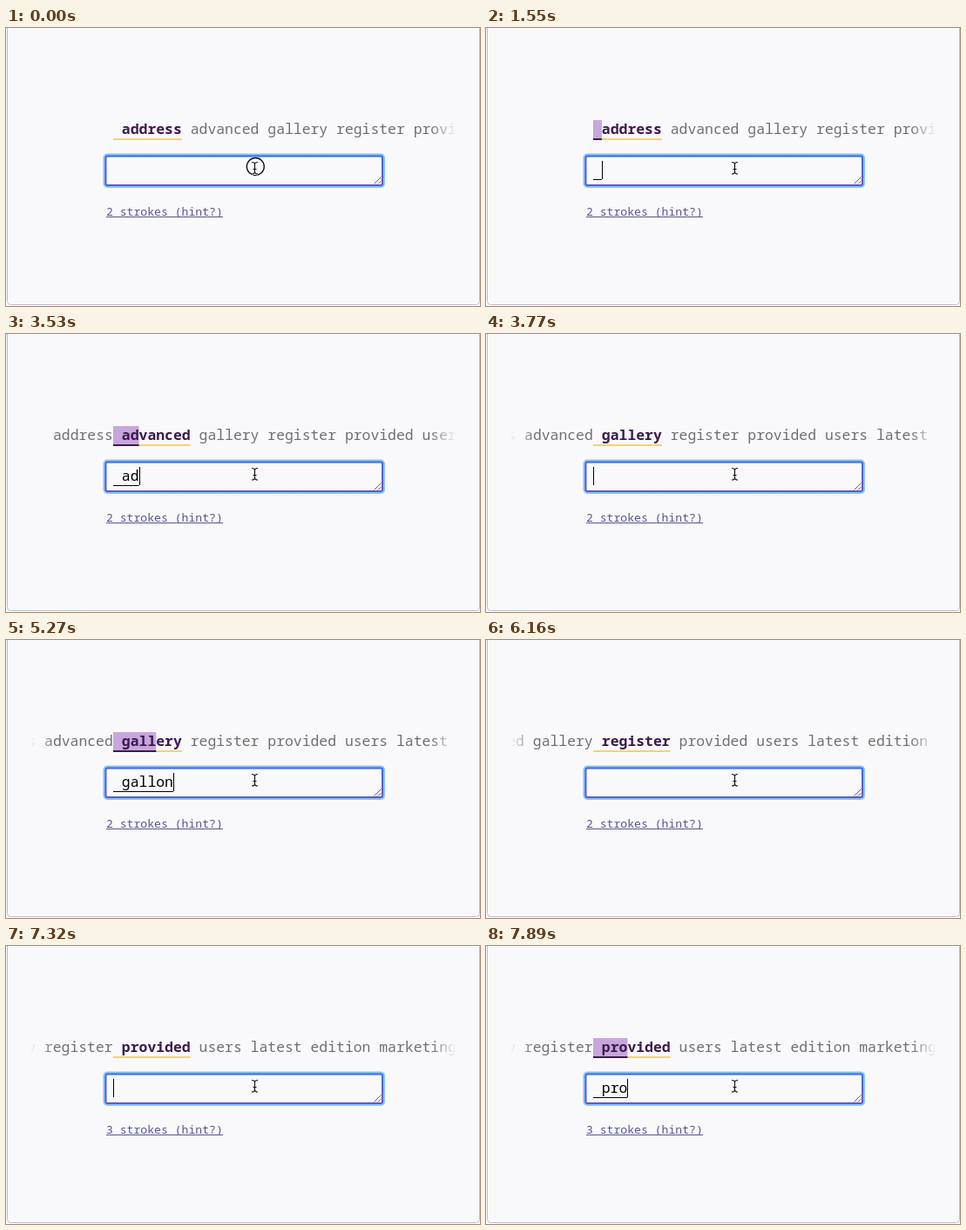
Write an HTML page that moves like this. It is 544x320 px and loops after 8 s.

```html
<!DOCTYPE html>
<html lang="en">
<head>
<meta charset="utf-8">
<title>Typing practice</title>
<style>
  html, body { margin: 0; width: 100%; height: 100%; overflow: hidden; background: #fff; }
  svg { display: block; width: 544px; height: 320px; }
  text { font: 16.427px "Noto Sans Mono", monospace; white-space: pre; }
  .word { fill: #716d73; }
  #current { fill: #3b1a4c; font-weight: 700; }
  #hint { fill: #57558c; font-size: 13.14px; font-weight: 500; }
</style>
</head>
<body>
<svg viewBox="0 0 544 320">
  <defs>
    <linearGradient id="fade">
      <stop offset="0" stop-color="#000"/>
      <stop offset=".055" stop-color="#fff"/>
      <stop offset=".94" stop-color="#fff"/>
      <stop offset="1" stop-color="#000"/>
    </linearGradient>
    <mask id="edges" maskUnits="userSpaceOnUse" x="28" y="100" width="489" height="40">
      <rect x="28" y="100" width="489" height="40" fill="url(#fade)"/>
    </mask>
    <linearGradient id="border" x2="0" y2="1">
      <stop offset="0" stop-color="#3f6bdc"/>
      <stop offset="1" stop-color="#6358c4"/>
    </linearGradient>
    <filter id="blur" x="-5%" y="-40%" width="110%" height="180%">
      <feGaussianBlur stdDeviation=".7"/>
    </filter>
  </defs>

  <rect x="1.5" y="-9.5" width="542" height="328" rx="4" fill="#f9f9fc" stroke="#bcbcc9"/>

  <g mask="url(#edges)">
    <rect id="mark" x="123" y="106" height="21" fill="#c9a5dd"/>
    <rect id="goal" x="123" y="127" height="2" fill="#fbd166"/>
    <rect id="done" x="123" y="127" height="2" fill="#3b1a4c"/>
    <text id="before" class="word" y="122"></text>
    <text id="current" x="123" y="122"></text>
    <text id="after" class="word" y="122"></text>
  </g>

  <rect x="114" y="147" width="318.5" height="34.5" rx="2.5" fill="none" stroke="#86c1fa" stroke-width="5" filter="url(#blur)"/>
  <rect x="114.5" y="147.5" width="317.5" height="33.5" rx="2" fill="#f9f9fc" stroke="url(#border)" stroke-width="2"/>
  <path d="M422.5 179.5l8-8M427 179.5l3.5-3.5" stroke="#666" stroke-width="1"/>
  <text id="typed" x="123" y="169"></text>
  <rect id="compose" x="123" y="174" height="1"/>
  <rect id="caret" y="153" width="1" height="21"/>

  <text id="hint" x="115" y="216"></text>
  <rect x="115" y="217" width="134" height="1" fill="#57558c"/>

  <g fill="none">
    <circle id="click" cx="286.3" cy="159.5" r="10" stroke="#111" stroke-width="1.3"/>
    <path id="beam" d="M282 154.500q3.500 0 3.500 2.500q0-2.500 3.500-2.500M285.500 156.500v9.500M283.500 162.500h4M282 168q3.500 0 3.500-2.500q0 2.500 3.500 2.500" stroke="#fff" stroke-width="3"/>
    <use href="#beam" style="display:none"/>
    <path d="M282 154.500q3.500 0 3.500 2.500q0-2.500 3.500-2.500M285.500 156.500v9.500M283.500 162.500h4M282 168q3.500 0 3.500-2.500q0 2.500 3.500 2.500" stroke="#111" stroke-width="1.200"/>
  </g>
</svg>
<script>
const LOOP = 8000, LEFT = 123, CHAR = 9.856;
const words = "address advanced gallery register provided users latest edition marketing".split(" ");
const strokes = [2, 2, 2, 2, 3];

// start time, word index, typed text, caret visible
const steps = [
  [0, 0, "", false], [170, 0, "", true], [650, 0, "", false], [1190, 0, "", true],
  [1550, 0, " ", true], [1790, 0, " a", true], [1850, 0, " ad", true],
  [2210, 1, "", true], [2690, 1, "", false], [3170, 1, "", true], [3530, 1, " ad", true],
  [3770, 2, "", true], [4250, 2, "", false], [4790, 2, "", true], [5270, 2, " gallon", true],
  [5620, 3, "", true], [6160, 3, "", false], [6690, 3, "", true], [6960, 3, " reg", true],
  [7320, 4, "", true], [7800, 4, "", false], [7890, 4, " pro", true]
];

const $ = id => document.getElementById(id);
const set = (id, name, value) => $(id).setAttribute(name, value);
const write = (id, value) => { $(id).textContent = value; };
const join = list => list.map(word => " " + word).join("");

function matching(a, b) {
  let n = 0;
  while (n < a.length && a[n] === b[n]) n++;
  return n;
}

function render(t) {
  const [, index, typed, caret] = steps.findLast(step => step[0] <= t);
  const before = join(words.slice(0, index));
  const current = " " + words[index];
  const matched = matching(typed, current) * CHAR;

  write("before", before);
  set("before", "x", LEFT - before.length * CHAR);
  write("current", current);
  write("after", join(words.slice(index + 1)));
  set("after", "x", LEFT + current.length * CHAR);
  set("goal", "width", current.length * CHAR);
  set("mark", "width", matched);
  set("done", "width", matched);

  write("typed", typed);
  set("compose", "width", typed.length * CHAR);
  set("caret", "x", Math.round(LEFT + typed.length * CHAR));
  set("caret", "opacity", caret ? 1 : 0);
  write("hint", strokes[index] + " strokes (hint?)");
  set("click", "opacity", t < 60 ? 1 : t < 170 ? 0.5 : 0);
}

function tick(now) {
  render(now % LOOP);
  requestAnimationFrame(tick);
}
render(0);
requestAnimationFrame(tick);
</script>
</body>
</html>
```
